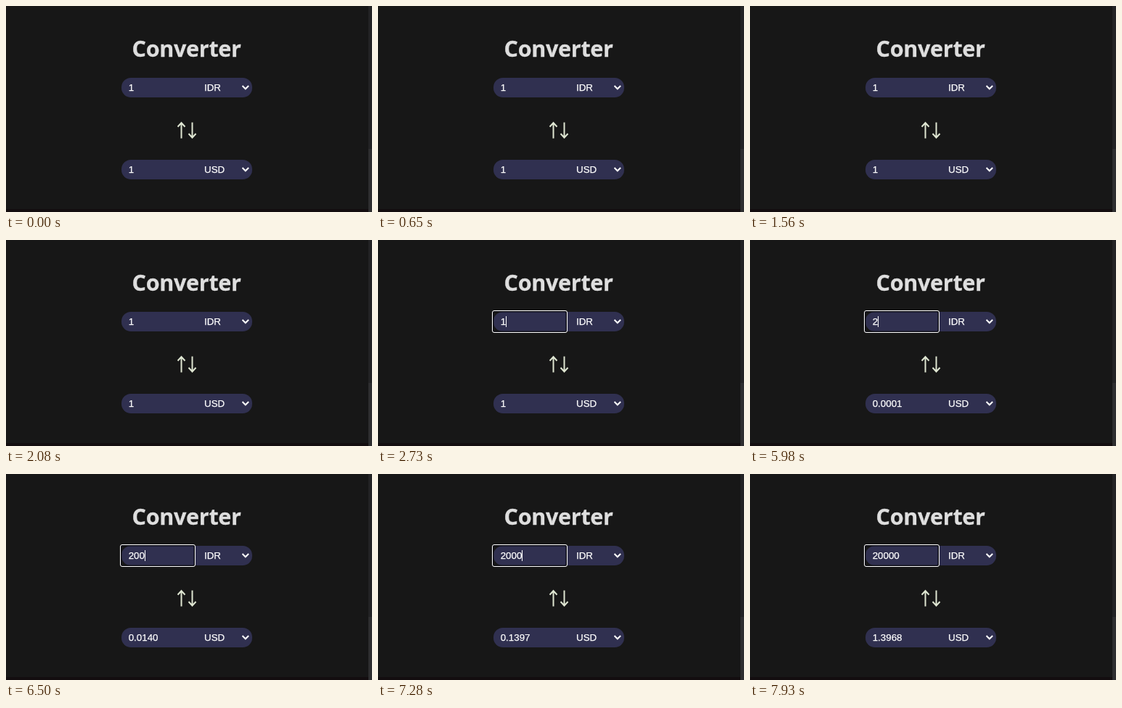
These frames come from a looping animation (504x284 px, 8 s). An HTML page:

```html
<!DOCTYPE html>
<html lang="en">
<head>
<meta charset="utf-8">
<title>Converter</title>
<style>
  html, body { margin: 0; width: 100%; height: 100%; overflow: hidden; background: #171717; }
  svg { display: block; width: 504px; height: 284px; }
  text { font: 13.333px "Liberation Sans", Arial, sans-serif; fill: #fff; stroke: #fff; stroke-width: .25px; }
  .title { font: 700 30.5px "Open Sans", "Noto Sans", sans-serif; letter-spacing: -.28px; fill: #dedede; stroke: #dedede; stroke-width: .3px; }
  .pill { fill: #303050; }
  .line { fill: none; stroke: #fff; stroke-width: 2; }
  .swap { stroke: #dfe6d2; }
  .ring { fill: none; stroke: #fff; }
  .gap { stroke: #101018; stroke-width: 1.5; }
</style>
</head>
<body>
<svg viewBox="0 0 504 284">
  <rect width="504" height="284" fill="#171717"/>
  <rect y="280" width="499" height="4" fill="#130d0f"/>
  <rect x="499" width="5" height="284" fill="#232325"/>
  <rect x="499" y="197" width="5" height="87" fill="#2e2e30"/>

  <text class="title" x="173.5" y="70">Converter</text>

  <rect class="pill" x="159" y="99" width="180" height="27" rx="13"/>
  <g id="focus">
    <rect class="ring gap" x="158.75" y="98.75" width="100.5" height="27.5" rx="2"/>
    <rect class="ring" x="157.5" y="97.5" width="103" height="30" rx="2.5"/>
  </g>
  <rect id="selection" x="168.5" y="105" width="7.5" height="15" fill="#1767d2"/>
  <text id="amount" x="168.7" y="117"></text>
  <rect id="caret" y="105" width="1" height="15" fill="#fff"/>
  <text x="273" y="117">IDR</text>
  <path class="line" d="M325.5 110l4.3 4.3 4.3-4.3"/>

  <path class="line swap" d="M241.5 182.5V161.5M236.5 166.5l5-5.5 5 5.5M256.5 160.5V181.5M251.5 176l5 5.5 5-5.5"/>

  <rect class="pill" x="159" y="212" width="180" height="27" rx="13"/>
  <text id="result" x="168.7" y="230"></text>
  <text x="273" y="230">USD</text>
  <path class="line" d="M325.5 223l4.3 4.3 4.3-4.3"/>
</svg>
<script>
  const LOOP = 8000, RATE = 0.00006984, FOCUS = 2730, SELECT = 3380, BLINK = 520;
  const keys = [[5980, "2"], [6240, "20"], [6500, "200"], [7280, "2000"], [7410, "20000"]];
  const el = id => document.getElementById(id);
  const [focus, selection, amount, caret, result] =
    ["focus", "selection", "amount", "caret", "result"].map(el);
  const show = (node, on) => node.setAttribute("visibility", on ? "visible" : "hidden");
  const start = performance.now();

  function draw() {
    const t = (performance.now() - start) % LOOP;
    const last = keys.filter(([at]) => at <= t).pop();
    const value = last ? last[1] : "1";
    const since = t - (last ? last[0] : FOCUS);
    const selected = t >= SELECT && !last;

    amount.textContent = value;
    result.textContent = last ? (value * RATE).toFixed(4) : "1";
    caret.setAttribute("x", Math.floor(169 + value.length * 7.415));
    show(focus, t >= FOCUS);
    show(selection, selected);
    // the caret restarts its blink at each key press
    show(caret, since >= 0 && !selected && since % (2 * BLINK) < BLINK);
    requestAnimationFrame(draw);
  }
  draw();
</script>
</body>
</html>
```
